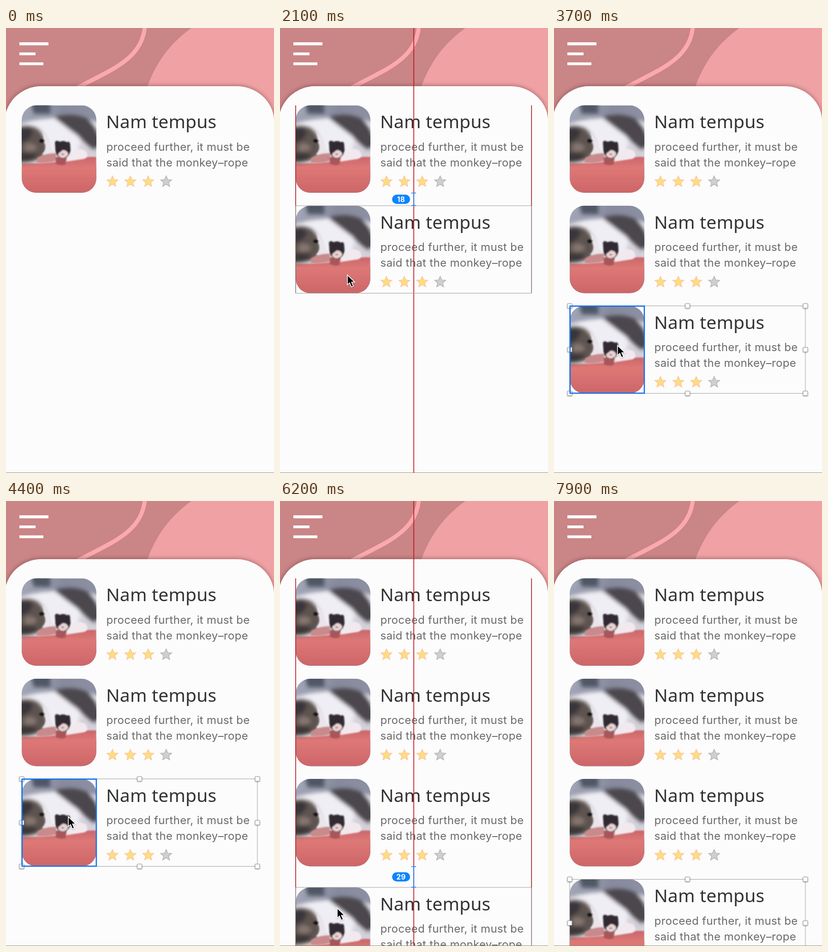
Recreate the animation shown at these times as an HTML page. Size 581 px wide and 964 px high, loop 8 s.

```html
<!DOCTYPE html>
<html lang="en">
<head>
<meta charset="utf-8">
<title>Card list</title>
<style>
  html, body { margin: 0; width: 100%; height: 100%; overflow: hidden; background: #fcfcfc; }
  svg { display: block; width: 100vw; height: 100vh; }
  .title { font: 39px "Noto Sans", sans-serif; letter-spacing: .2px; fill: #333; }
  .body { font: 24px Inter, sans-serif; letter-spacing: .33px; fill: #6a6a6a; }
  .red { stroke: #c0141e; stroke-width: 1.7; }
  .side { stroke: #a8141c; stroke-width: 1.6; }
  .dim { stroke: #6a5058; stroke-width: 1.2; }
  .edge { stroke: #9c9c9c; stroke-width: 1; fill: none; }
  .blue { stroke: #0a84ff; stroke-width: 1.5; fill: none; }
  #pill rect { fill: #0a84ff; }
  #pill text { font: 700 15.5px Inter, sans-serif; letter-spacing: .4px; fill: #fff; text-anchor: middle; }
  #hover { fill: none; stroke: #1270f0; stroke-width: 2.6; }
</style>
</head>
<body>
<svg viewBox="0 0 581 964" preserveAspectRatio="none">
  <defs>
    <clipPath id="frame"><rect x="34" y="167.5" width="162" height="189.5" rx="32"/></clipPath>
    <filter id="soft" x="-20%" y="-20%" width="140%" height="140%"><feGaussianBlur stdDeviation="1.4"/></filter>
    <filter id="softer" x="-30%" y="-30%" width="160%" height="160%"><feGaussianBlur stdDeviation="4"/></filter>
    <filter id="shade" x="-5%" y="-5%" width="110%" height="110%">
      <feDropShadow dx="0" dy="-1" stdDeviation="4" flood-color="#502020" flood-opacity=".5"/>
    </filter>
    <filter id="lift" x="-50%" y="-50%" width="200%" height="200%">
      <feDropShadow dx="0" dy="1" stdDeviation="1" flood-opacity=".35"/>
    </filter>
    <linearGradient id="wall" x2="1" y2=".4">
      <stop stop-color="#a4a8b8"/><stop offset=".5" stop-color="#868a9c"/><stop offset="1" stop-color="#8f92a4"/>
    </linearGradient>
    <linearGradient id="sofa" x2="0" y2="1">
      <stop stop-color="#c9666a"/><stop offset=".3" stop-color="#de7876"/><stop offset="1" stop-color="#cc6568"/>
    </linearGradient>
    <path id="star" d="M0-12.2 3.5-4.2 12-3.6 5.5 2 7.6 10.6 0 6-7.6 10.6-5.5 2-12-3.6-3.5-4.2Z" stroke-width="1.4"/>

    <g id="card">
      <g clip-path="url(#frame)">
        <g transform="translate(34 167.5)">
          <rect width="162" height="190" fill="url(#wall)"/>
          <g filter="url(#softer)">
            <path d="M20-8H62V18H26Z" fill="#4f5665"/>
            <path d="M-10 44Q24 30 60 28 110 18 175 40V130H-10Z" fill="#efeef4"/>
            <path d="M70 26Q110 14 140 28 168 44 172 86L158 98Q138 88 122 66 100 50 70 26Z" fill="#4b464e"/>
            <path d="M126 78Q146 100 172 96V116H120Z" fill="#d3d0da"/>
          </g>
          <path d="M0 126Q60 126 100 118T162 112V190H0Z" fill="url(#sofa)" filter="url(#soft)"/>
          <g filter="url(#softer)">
            <path d="M-10 48Q14 40 34 50 50 64 54 84 60 104 40 116 20 126-10 124Z" fill="#5d5350"/>
            <path d="M-10 52Q14 44 24 56 22 76-10 84Z" fill="#38343a"/>
            <path d="M-10 104Q16 98 34 108 28 124-10 124Z" fill="#3e3837"/>
            <path d="M8 84Q24 78 34 92 22 104 6 98Z" fill="#85766f"/>
          </g>
          <g filter="url(#soft)">
            <path d="M45 56Q60 72 64 92L74 104Q58 112 44 106 56 94 49 80Z" fill="#eae5ea"/>
            <path d="M34 114Q54 102 74 104L76 120Q54 127 32 124Z" fill="#c98a8c"/>
            <path d="M104 104Q122 88 138 98 148 110 136 116L96 122Z" fill="#f1e9ee"/>
            <ellipse cx="44" cy="77" rx="6" ry="4" fill="#191719"/>
            <path d="M74 112H98L95 128Q84 132 74 126Z" fill="#a8575a"/>
            <path d="M72 80Q75 74 82 79 92 75 98 80 104 77 105 84L106 98Q104 113 89 115 72 112 73 94Z" fill="#302b33"/>
            <path d="M89 97Q99 97 101 106 96 114 88 114 79 112 79 105Z" fill="#e8d5d5"/>
            <path d="M86 106H92" stroke="#a84c52" stroke-width="2.5"/>
          </g>
        </g>
      </g>
      <text class="title" x="217" y="217">Nam tempus</text>
      <text class="body" x="217.5" y="265.5">proceed further, it must be</text>
      <text class="body" x="217.5" y="299.5">said that the monkey–rope</text>
      <g fill="#fddd7c" stroke="#f9c6a4">
        <use href="#star" x="230.7" y="332.6"/><use href="#star" x="269.5" y="332.6"/><use href="#star" x="308.3" y="332.6"/>
      </g>
      <use href="#star" x="347.2" y="332.6" fill="#cfcfcf" stroke="#b3b3b3"/>
    </g>
  </defs>

  <rect width="581" height="300" fill="#ca8586"/>
  <path d="M402 0C352 36 324 78 306 128L306 220H581V0Z" fill="#efa1a4"/>
  <path d="M301-3C295 70 222 92 156 129" fill="none" stroke="#fba9ac" stroke-width="9"/>
  <path d="M29 31H92V37.5H29ZM29 53H64V59H29ZM29 74.5H81V80.5H29Z" fill="#fff"/>
  <path d="M-3 970V204A80 78 0 0 1 77 126H499C543 126 579 158 581 199V970Z" fill="#fcfcfc" filter="url(#shade)"/>

  <use href="#card"/>
  <g id="copies"></g>

  <g id="guides">
    <line class="red" x1="290" x2="290" y2="964"/>
    <line class="red" id="middle" x2="581"/>
    <path class="side" id="sides"/>
    <path class="dim" id="sidesLow"/>
    <path class="edge" id="edges"/>
    <path class="blue" id="bracket"/>
    <g id="pill"><rect height="20" y="-10"/><text y="5.6"></text></g>
  </g>

  <g id="selection">
    <rect class="edge" x="34" y="167.5" width="511" height="189.5"/>
    <g id="handles" fill="#fff" stroke="#8c8c8c" filter="url(#lift)"></g>
  </g>
  <rect id="hover" x="34.8" y="168" width="161" height="188.6"/>

  <path id="cursor" d="M0 0V21.5L5 17 8.8 26 13 24.2 9.2 15.5H16Z" fill="#000" stroke="#fff" stroke-width="1.6" filter="url(#lift)"/>
  <rect y="963" width="581" height="1" fill="#8d8d84"/>
</svg>

<script>
const LOOP = 8000, STEP = 100;
const STAGE = 964, TOP = 167.5, HEIGHT = 189.5, PITCH = 217.5, UNIT = 1.5556;
const $ = id => document.getElementById(id);

// Each drag: start, end, and the copy's offset over time.
const drags = [
  { from: 1000, to: 2200, path: [[1000, 0], [1400, 129], [1900, PITCH]] },
  { from: 2600, to: 3600, path: [[2600, PITCH], [3100, 408.5], [3400, 2 * PITCH - .5]] },
  { from: 5200, to: 6800, path: [[5200, 2 * PITCH - .5], [6200, 669.5], [6600, 3 * PITCH - .5]] }
];
const cursorX = [[200, 178], [800, 152], [1400, 149], [2100, 146], [3100, 140], [4400, 135], [6200, 124], [7100, 122], [7700, 150]];
const cursorY = [[200, 995], [800, 345], [1000, 345], [1400, 486], [2100, 535], [2450, 488], [2600, 488],
  [3100, 675], [3500, 688], [4400, 684], [4900, 655], [5200, 655], [6200, 882], [6600, 868], [7100, 868], [7700, 1000]];

// Smooth monotone curve through [time, value] points.
function track(keys, t) {
  const last = keys.length - 1;
  if (t <= keys[0][0]) return keys[0][1];
  if (t >= keys[last][0]) return keys[last][1];
  const slope = i => (keys[i + 1][1] - keys[i][1]) / (keys[i + 1][0] - keys[i][0]);
  const tangent = i => {
    if (i === 0 || i === last) return 0;
    const a = slope(i - 1), b = slope(i);
    return a * b > 0 ? 2 * a * b / (a + b) : 0;
  };
  const i = keys.findIndex(k => k[0] > t) - 1;
  const [t0, v0] = keys[i], [t1, v1] = keys[i + 1];
  const span = t1 - t0, u = (t - t0) / span, w = 1 - u;
  return v0 * w * w * (1 + 2 * u) + v1 * u * u * (3 - 2 * u)
    + span * u * w * (tangent(i) * w - tangent(i + 1) * u);
}

function add(parent, tag, attrs) {
  const el = document.createElementNS('http://www.w3.org/2000/svg', tag);
  for (const k in attrs) el.setAttribute(k, attrs[k]);
  return parent.appendChild(el);
}
const show = (el, on) => { el.style.display = on ? '' : 'none'; };
const shift = (el, x, y) => el.setAttribute('transform', `translate(${x} ${y})`);

const copies = drags.map(() => add($('copies'), 'use', { href: '#card' }));
for (const x of [34, 289.5, 545])
  for (const k of [0, .5, 1])
    if (x !== 289.5 || k !== .5)
      add($('handles'), 'rect', { x: x - 5, y: TOP + HEIGHT * k - 5, width: 10, height: 10, rx: 1 });

function drawGuides(prev, off) {
  const top = TOP + off, bottom = top + HEIGHT;
  $('sides').setAttribute('d', `M34 ${TOP}V${top}M545.3 ${TOP}V${top}`);
  $('sidesLow').setAttribute('d', `M34 ${top}V${bottom}M545.3 ${top}V${bottom}`);
  $('edges').setAttribute('d', `M34 ${top}H545M34 ${bottom}H545`);

  const mid = top + HEIGHT / 2 - .3;
  $('middle').setAttribute('y1', mid);
  $('middle').setAttribute('y2', mid);
  show($('middle'), Math.abs(off - 408.5) < 3);

  const apart = off - prev >= HEIGHT;
  const start = TOP + prev + (apart ? HEIGHT : 0);
  const gap = Math.round((top - start) / UNIT);
  show($('pill'), gap > 0);
  show($('bracket'), gap > 0);
  $('bracket').setAttribute('d', `M284.5 ${start + .5}H295M284.5 ${top - .5}H295M290 ${start}V${top}`);
  const [box, label] = $('pill').children;
  const width = [0, 19, 39, 49][String(gap).length];
  box.setAttribute('x', -width);
  box.setAttribute('width', width);
  box.setAttribute('rx', width < 20 ? 6 : 10);
  label.setAttribute('x', -width / 2);
  label.textContent = gap;
  shift($('pill'), 282, (start + top) / 2);
}

function draw(t) {
  const offs = [0];
  let active = -1;
  drags.forEach((d, i) => {
    show(copies[i], t >= d.from);
    if (t < d.from) return;
    active = i;
    offs.push(track(d.path, t));
    shift(copies[i], 0, offs[i + 1]);
  });

  const dragging = active >= 0 && t < drags[active].to;
  const off = offs[offs.length - 1];
  show($('guides'), dragging);
  if (dragging) drawGuides(offs[offs.length - 2], off);

  show($('selection'), !dragging && t >= 900);
  shift($('selection'), 0, off);

  const x = track(cursorX, t), y = track(cursorY, t);
  shift($('cursor'), x, y);
  const over = offs.find(o => y < STAGE && y > TOP + o && y < TOP + o + HEIGHT);
  show($('hover'), !dragging && over !== undefined);
  if (over !== undefined) shift($('hover'), 0, over);
}

const begin = performance.now();
function tick() {
  const t = (performance.now() - begin) % LOOP;
  draw(Math.floor(t / STEP) * STEP);
  requestAnimationFrame(tick);
}
tick();
</script>
</body>
</html>
```
